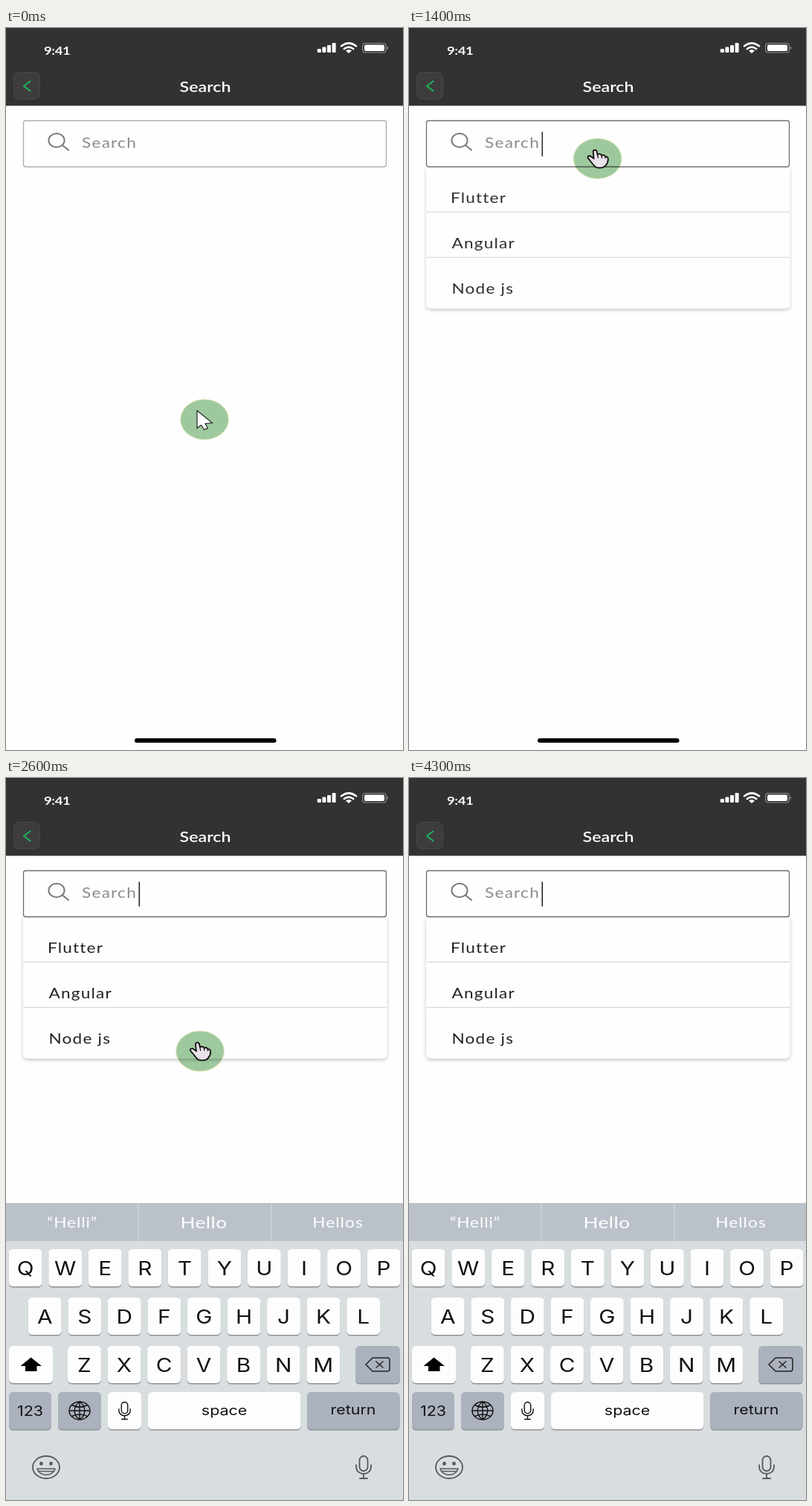
An HTML page for the animation above (6.7 s loop, 534 px wide and 970 px high).

```html
<!DOCTYPE html>
<html lang="en">
<head>
<meta charset="utf-8">
<title>Search</title>
<style>
html, body { margin: 0; width: 100%; height: 100%; overflow: hidden; background: #fefefe; }
svg { display: block; width: 100vw; height: 100vh; }
.ui { font-family: Lato, "Noto Sans", sans-serif; }
.key { font-family: Inter, Roboto, sans-serif; }
.line { fill: none; stroke-linecap: round; stroke-linejoin: round; }
#list { filter: drop-shadow(0 2px 2.5px rgba(0, 0, 0, .22)); }
#halo { mix-blend-mode: multiply; }
</style>
</head>
<body>
<svg id="stage" viewBox="0 0 534 970"></svg>
<script>
const LOOP = 6700, STEP = 100;
const ASPECT = 1.19; // the phone screen is shown wider than tall by this factor

const rect = (x, y, w, h, r, fill, more = '') =>
  `<rect x="${x}" y="${y}" width="${w}" height="${h}" rx="${r}" fill="${fill}" ${more}/>`;
const line = (d, color, width = 1.5) =>
  `<path class="line" d="${d}" stroke="${color}" stroke-width="${width}"/>`;
const text = (str, x, y, size, fill, { cls = 'ui', anchor = 'start', gap = 0, weight = 400 } = {}) =>
  `<text class="${cls}" transform="translate(${x} ${y}) scale(${ASPECT} 1)" font-size="${size}" fill="${fill}"
    text-anchor="${anchor}" letter-spacing="${gap}" font-weight="${weight}">${str}</text>`;

function header() {
  const bars = [5, 7.5, 10, 13].map((h, i) => rect(418.8 + i * 6.6, 33 - h, 5, h, 1.3, '#fff')).join('');
  return rect(0, 0, 534, 104.5, 0, '#323232') +
    text('9:41', 51, 36, 15.5, '#fff', { weight: 700, gap: -.3 }) + bars +
    line('M451 24.3Q461 16.4 471 24.3M454.8 28Q461 23.2 467.2 28', '#fff', 2.6) +
    '<path d="M457 30.6Q461 27.6 465 30.6L461 34Z" fill="#fff"/>' +
    rect(479.7, 20.5, 31.5, 12.5, 3.5, 'none', 'stroke="#8e8e8e" stroke-width="1.2"') +
    rect(482, 22.5, 27, 8.6, 2, '#fff') +
    '<path d="M512.6 24.5q3 2.2 0 4.6z" fill="#999"/>' +
    rect(10.5, 59.5, 35, 36, 7, '#3d3d3d', 'stroke="#484848"') +
    line('M32.5 71.5L24 78L32.5 84.5', '#1db55e', 2) +
    text('Search', 268, 86, 19.5, '#fff', { anchor: 'middle', weight: 600 });
}

function searchBox() {
  return rect(23.5, 124.5, 488, 62, 3, 'none', 'id="frame" stroke-width="1.3"') +
    '<ellipse cx="68" cy="151" rx="10.6" ry="9.2" fill="none" stroke="#7c7c7c" stroke-width="2"/>' +
    line('M76 157.5L84 164', '#7c7c7c', 2.2) +
    text('Search', 102, 161, 19, '#8c8c8c', { gap: 1.05 });
}

function dropdown() {
  const rows = ['Flutter', 'Angular', 'Node js']
    .map((name, i) => text(name, i ? 57.5 : 56, 235 + i * 61, 19, '#222', { gap: 1 })).join('');
  return '<path id="list" d="M23 187H512.5V370q0 7-7 7H30q-7 0-7-7z" fill="#fefefe"/>' +
    line('M24 247.3H512M24 308.3H512', '#cdcdcd', 1.1) + rows;
}

function mic(x, y, scale, color) {
  return `<g transform="translate(${x} ${y}) scale(${scale})">` +
    rect(-5.5, -15, 11, 20, 5.5, 'none', `stroke="${color}" stroke-width="1.8"`) +
    line('M-10-3v2c0 13 20 13 20 0v-2M0 9v6M-5 15h10', color, 1.8) + '</g>';
}

function keyboard() {
  const GRAY = '#abb2be';
  const key = (x, y, w, fill = '#fdfdfd', h = 50) =>
    rect(x, y + 1.5, w, h, 5.5, '#8d9298') + rect(x, y, w, h, 5.5, fill);
  const row = (letters, x, y) => [...letters].map((c, i) =>
    key(x + i * 53.55, y, 44.8) +
    text(c, x + i * 53.55 + 22.4, y + 34.5, 25, '#111', { cls: 'key', anchor: 'middle' })).join('');
  const label = (str, x, y) => text(str, x, y, 18, '#111', { cls: 'key', anchor: 'middle' });
  const hint = (str, x, y, size, gap) => text(str, x, y, size, '#fff', { anchor: 'middle', gap });

  return rect(0, 571, 534, 440, 0, '#d8dde0') + rect(0, 571, 534, 51, 0, '#bac1c9') +
    line('M178 572V621M357 572V621', '#cdd3d8', 1.5) +
    hint('“Helli”', 89, 604, 19, .8) + hint('Hello', 266, 605, 22, .4) + hint('Hellos', 446.5, 604, 19, .9) +
    row('QWERTYUIOP', 3.7, 633) + row('ASDFGHJKL', 29.8, 698) + row('ZXCVBNM', 83, 763) +
    key(4, 763, 59) + '<path d="M33.5 778.5L48 790H41.5V797H26V790H19.5Z"/>' +
    key(470, 763, 60, GRAY) +
    line('M484 788L493 779H513q3 0 3 3V794q0 3-3 3H493ZM498 784l9 8m0-8l-9 8', '#222', 1.5) +
    key(4, 825, 57, GRAY) + label('123', 32.5, 857) +
    key(70, 825, 58, GRAY) +
    line('M85 850a14 12 0 1 0 28 0a14 12 0 1 0-28 0H113M99 838V862M99 838c-9 6-9 18 0 24c9-6 9-18 0-24M88.5 842.5q10.5 5 21 0M88.5 857.5q10.5-5 21 0', '#111', 1.4) +
    key(137, 825, 45) + mic(159.5, 850, .77, '#111') +
    key(191, 825, 205.5) + label('space', 293.5, 856) +
    key(405, 825, 124.5, GRAY) + label('return', 467, 855) +
    '<ellipse cx="54" cy="926" rx="18" ry="15" fill="none" stroke="#55595d" stroke-width="1.8"/>' +
    '<g fill="#55595d"><ellipse cx="47.5" cy="921" rx="2.3" ry="2.6"/><ellipse cx="60.5" cy="921" rx="2.3" ry="2.6"/></g>' +
    line('M42 928H66C63 939 45 939 42 928ZM44 931.5H64', '#55595d', 1.6) +
    mic(481, 926, 1, '#55595d');
}

function pointer() {
  return '<ellipse id="halo" rx="32.3" ry="27" fill="#9fca9f" stroke="#dbe2b0"/>' +
    '<path id="arrow" d="M-10-12V11.5L-4.5 7.5L-.3 13.8L4.3 11.7L1 5.5L10.5 4.5Z" fill="#fff" stroke="#222" stroke-width="1.2"/>' +
    '<g id="hand" stroke="#111" stroke-width="1.8" stroke-linejoin="round" stroke-linecap="round">' +
    '<path d="M-6-9C-6-12.5-1-12.5-1-9L0-5C1-7 5-6.5 5.5-4C7-5.5 10-4.5 10.5-2.5C12-3 14-2 14 0C14.5 4 13 7 11 9C8 13.5-2 13.5-5 9C-8 5-11 2-13-1C-14-3-11-4.5-9-3L-5 0Z" fill="#e9e2ea"/>' +
    '<path d="M0-5l.6 4M5.5-4l.3 3M10.5-2.5v2" fill="none" stroke-width="1.3"/></g>';
}

const stage = document.getElementById('stage');
stage.innerHTML = rect(0, 0, 534, 970, 0, '#fefefe') + header() +
  `<g id="menu">${dropdown()}</g>` + searchBox() +
  `<g id="caret">${line('M179.3 140V172', '#222', 1.6)}</g>` +
  rect(173, 954.3, 190.5, 6, 3, '#000') +
  `<g id="keys">${keyboard()}</g><g id="pointer">${pointer()}</g>`;

const part = Object.fromEntries([...stage.querySelectorAll('[id]')].map(el => [el.id, el]));

// time, x, y of the pointer
const PATH = [
  [0, 267, 526], [100, 269, 510], [300, 275, 424], [500, 263, 292], [700, 253.5, 205],
  [800, 251.5, 187], [1000, 250, 175], [1100, 250, 175], [1800, 258.5, 176], [2100, 258.5, 176],
  [2200, 243, 237], [2600, 261, 367], [2800, 269, 418], [3100, 268, 474], [3400, 265.5, 504],
  [4000, 265.5, 504], [4100, 425, 612], [4200, 512, 664], [LOOP, 512, 664]
];

function pointerAt(t) {
  const i = PATH.findIndex(p => p[0] > t);
  const [t0, x0, y0] = PATH[i - 1], [t1, x1, y1] = PATH[i];
  const k = (t - t0) / (t1 - t0);
  return [x0 + (x1 - x0) * k, y0 + (y1 - y0) * k];
}

const show = (el, on) => el.setAttribute('visibility', on ? 'visible' : 'hidden');

function draw(t) {
  const open = Math.min(1, Math.max(0, (t - 1100) / 400));
  const fade = 1 - (1 - open) ** 2;
  part.menu.setAttribute('opacity', fade);
  part.caret.setAttribute('opacity', fade);
  const shade = Math.round(172 - 64 * fade);
  part.frame.setAttribute('stroke', `rgb(${shade},${shade},${shade})`);

  show(part.keys, t >= 2200);
  const drop = t < 2600 ? 20 * Math.exp((2200 - t) / 80) : 0;
  part.keys.setAttribute('transform', `translate(0 ${drop})`);

  const [x, y] = pointerAt(t);
  part.pointer.setAttribute('transform', `translate(${x} ${y})`);
  const hand = (t >= 800 && t < 1500) || t >= 2200;
  const inside = t < 4300;
  show(part.halo, inside);
  show(part.hand, inside && hand);
  show(part.arrow, inside && !hand);
}

const start = performance.now();
function tick() {
  const t = (performance.now() - start) % LOOP;
  draw(Math.floor(t / STEP) * STEP);
  requestAnimationFrame(tick);
}
tick();
</script>
</body>
</html>
```
